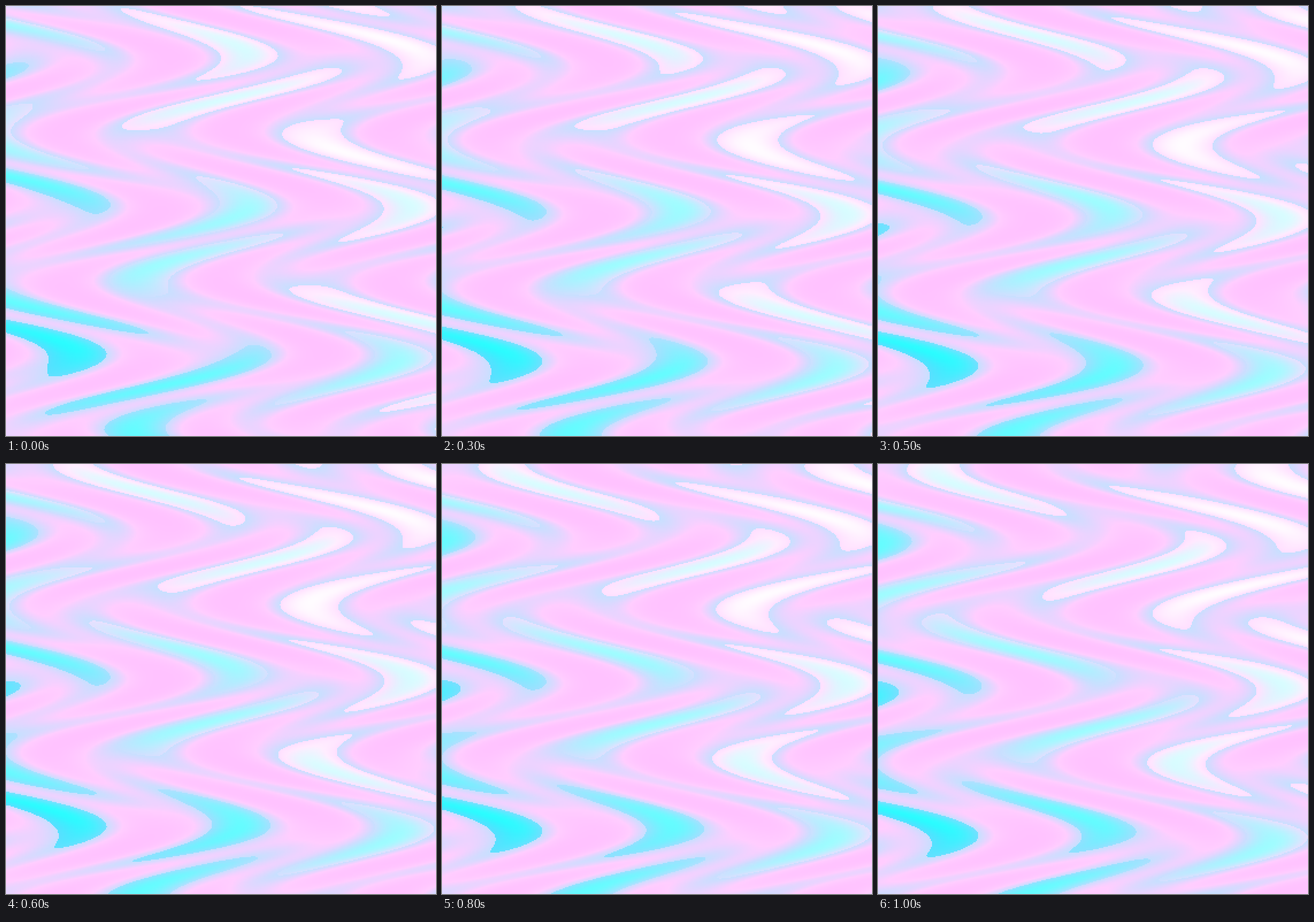
Write an HTML page with a canvas that moves like this. It is 748 px wide and 748 px high and loops after 1100 ms.

```html
<!DOCTYPE html>
<html lang="en">
<head>
<meta charset="utf-8">
<title>Holographic waves</title>
<style>
  html, body { margin: 0; width: 100%; height: 100%; overflow: hidden; background: #fcf; }
  canvas { display: block; width: 100vw; height: 100vh; image-rendering: pixelated; }
</style>
</head>
<body>
<canvas id="stage" width="374" height="374"></canvas>
<script>
const STAGE = 748, STEP_MS = 100, STEPS = 11;
const WAVE = 0.0122;              // angular frequency of the up-and-down bend
const CELL = 2 * Math.PI / 288;   // angular frequency of the blob lattice
const TILT = 0.034;               // slight rotation of the lattice
const EDGE = 0.38;                // level where a blob begins

const canvas = document.getElementById("stage");
const ctx = canvas.getContext("2d");
const size = canvas.width;
const scale = STAGE / size;
const image = ctx.createImageData(size, size);

function shade(x, y, swing, t, out, i) {
  // Bend sideways by height, then up and down by the bent x.
  const bentX = x - swing;
  const bentY = y + 41 * Math.sin(WAVE * bentX - 3.56 + t);
  const b = bentY - TILT * (bentX - 256) - 53;
  const rowWave = Math.cos(b * CELL);
  const a = bentX + TILT * bentY - 268 + 8 * rowWave;
  const v = Math.cos(a * CELL) * rowWave;

  let red = 236 - 95 * v;
  if (v > EDGE) red += 18 + 0.2 * (a - b + 288);
  out[i] = red;
  out[i + 1] = 211 + 29 * v + 12 * v * v;
  out[i + 2] = 255;
  out[i + 3] = 255;
}

function draw(step) {
  const t = step * 0.1;
  for (let row = 0, i = 0; row < size; row++) {
    const y = (row + 0.5) * scale;
    const swing = 170 * Math.cos(2 * WAVE * (y - 91) - t);
    for (let col = 0; col < size; col++, i += 4) {
      shade((col + 0.5) * scale, y, swing, t, image.data, i);
    }
  }
  ctx.putImageData(image, 0, 0);
}

const start = performance.now();
let shown = -1;

function tick() {
  const elapsed = Math.max(0, performance.now() - start);
  const step = Math.floor(elapsed / STEP_MS) % STEPS;
  if (step !== shown) draw(shown = step);
  requestAnimationFrame(tick);
}
tick();
</script>
</body>
</html>
```
